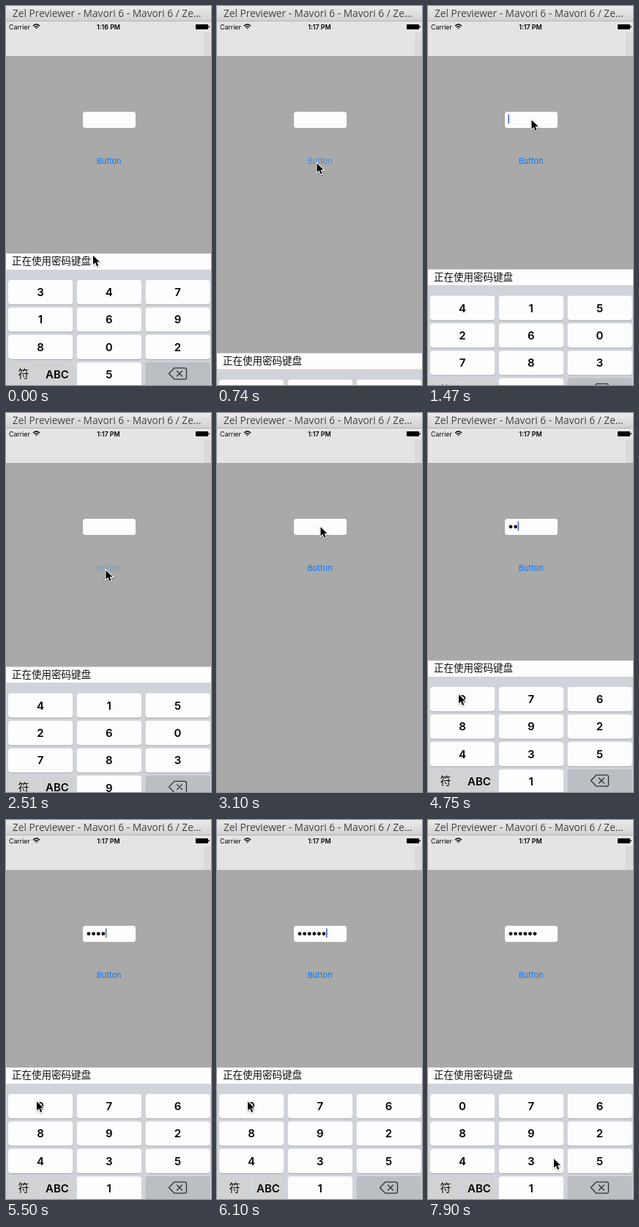
Recreate the animation shown at these times as an HTML page. Size 280 by 516 pixels, loop 8000 ms.

```html
<!DOCTYPE html>
<html lang="en">
<head>
<meta charset="utf-8">
<title>Password keyboard</title>
<style>
  html, body { margin: 0; width: 100%; height: 100%; overflow: hidden; background: #a9a9a9; }
  svg { display: block; width: 280px; height: 516px; font-family: Inter, "Liberation Sans", sans-serif; }
  .title { font-family: "Open Sans", "Noto Sans", sans-serif; fill: #444; }
  .cjk { font-family: "Noto Sans CJK SC", "Noto Sans CJK", sans-serif; font-weight: 300; fill: #111; }
  .bold { font-weight: 600; }
  .mid { text-anchor: middle; }
  .key { fill: #fdfdfd; }
  .key.down { fill: #c0c3c8; }
  .shade { fill: #a3a6ab; }
  #cursor { fill: #000; stroke: #fff; stroke-width: 2; paint-order: stroke; filter: drop-shadow(0 1px 1px rgba(0, 0, 0, .3)); }
</style>
</head>
<body>
<svg viewBox="0 0 280 516">
  <defs>
    <linearGradient id="bar" x2="0" y2="1">
      <stop offset="0" stop-color="#ebebeb"/>
      <stop offset="1" stop-color="#d2d2d2"/>
    </linearGradient>
  </defs>

  <rect width="280" height="516" fill="#a9a9a9"/>
  <rect y="20" width="280" height="48" fill="#e4e4e4"/>
  <rect x="270" y="36" width="10" height="32" fill="#dadada"/>
  <rect width="280" height="20" fill="url(#bar)"/>
  <rect y="20" width="280" height="1" fill="#b4b4b4"/>
  <text class="title" x="9" y="15" font-size="13.7">Zel Previewer - Mavori 6 - Mavori 6 / Ze…</text>

  <text x="4" y="31.5" font-size="8.8">Carrier</text>
  <g fill="none" stroke="#000" stroke-width="1.4">
    <path d="M37 27.2Q41.5 22.8 46 27.2M38.8 29.1Q41.5 26.4 44.2 29.1"/>
    <path d="M41.5 31.6l-1.2-1.4q1.2-1 2.4 0z" fill="#000" stroke="none"/>
  </g>
  <text id="clock" class="bold mid" x="140" y="31.5" font-size="8.8"></text>
  <rect x="259" y="25" width="17" height="6.7" rx="1" fill="#000"/>
  <rect x="276.5" y="27" width="1.3" height="2.5" fill="#000"/>

  <rect x="105" y="144" width="72" height="22" rx="3.5" fill="#fdfdfd"/>
  <g id="dots"></g>
  <rect id="caret" y="147.5" width="1.6" height="12.5" fill="#4668dc"/>
  <text id="button" class="mid" x="140.6" y="215" font-size="11" fill="#087aff">Button</text>

  <g id="board">
    <rect y="337" width="280" height="22" fill="#fdfdfd"/>
    <text class="cjk" x="8" y="352" font-size="13.5">正在使用密码键盘</text>
    <rect y="359" width="280" height="180" fill="#d0d3d9"/>
    <g id="keys"></g>
    <g fill="#d2d2d3">
      <rect x="3" y="485" width="42" height="33.5"/>
      <rect x="49" y="485" width="42" height="33.5"/>
    </g>
    <text class="cjk mid" x="24" y="506" font-size="15">符</text>
    <text class="bold mid" x="70" y="506.5" font-size="15">ABC</text>
    <rect x="190.5" y="485" width="88.5" height="33.5" rx="4" fill="#bbbec3"/>
    <g fill="none" stroke="#333" stroke-width="1.3" stroke-linejoin="round" stroke-linecap="round">
      <path d="M222.5 500.5l7.5-7.7h14q2.5 0 2.5 2.5v10.4q0 2.5-2.5 2.5h-14z"/>
      <path d="M233.5 497l7 7m0-7l-7 7"/>
    </g>
  </g>

  <path id="cursor" d="M1 1.7V14L4 11.2L6.2 16.4L8.2 15.6L6 10.4H10Z"/>
</svg>
<script>
const LOOP = 8000;
const HEIGHT = 179;
const LAYOUTS = ['3471698025', '4152607839', '0768924351'];
const HIDES = [590, 2491];
const SHOWS = [1270, 3405];
const PRESSES = [[4300, 4450], [5050, 5200], [5350, 5500], [5650, 5800], [5950, 6100],
                 [6850, 7000], [7150, 7300], [7450, 7600]];
const TYPED = [4450, 4750, 5200, 5500, 5800, 6100];
const CARET = [[1320, 1910], [2360, 2500], [3405, 6700], [7150, 7750]];
const PATH = [[0, 118, 338], [450, 135.5, 212.5], [740, 135.5, 212.5], [1030, 140.5, 153.5],
              [1620, 140.5, 153.5], [2360, 135.5, 212.5], [2650, 135.5, 212.5], [3100, 140.5, 153.5],
              [3400, 140.5, 153.5], [3700, 118, 259], [4000, 41, 381.5], [7600, 41, 381.5],
              [7900, 171, 459.5]];

const SHORT = [3, 6, 9, 14, 18];
const TICKS = [0];
while (TICKS.length < 54) {
  const n = TICKS.length;
  TICKS.push(TICKS[n - 1] + (SHORT.includes(n) ? 140 : 150));
}

const $ = id => document.getElementById(id);
const within = (spans, t) => spans.some(([a, b]) => t >= a && t < b);

function add(parent, name, attrs) {
  const el = document.createElementNS('http://www.w3.org/2000/svg', name);
  for (const k in attrs) el.setAttribute(k, attrs[k]);
  return parent.appendChild(el);
}

const keys = [...Array(10).keys()].map(i => {
  const x = 3 + (i === 9 ? 1 : i % 3) * 93.75;
  const y = 373 + Math.floor(i / 3) * 37.4;
  const box = { x, width: 88.3, height: 33.2, rx: 4 };
  add($('keys'), 'rect', { ...box, y: y + 1, class: 'shade' });
  const cap = add($('keys'), 'rect', { ...box, y, class: 'key' });
  const label = add($('keys'), 'text', { x: x + 44, y: y + 22, 'font-size': 15, class: 'bold mid' });
  return { cap, label };
});

const dots = TYPED.map((_, i) => add($('dots'), 'circle', { cx: 113 + i * 6.6, cy: 154.8, r: 2.4 }));

// Critically damped spring: the share of travel left after ms.
function left(ms) {
  const a = Math.max(0, ms) * 0.01826;
  return Math.exp(-a) * (1 + a);
}

function drop(t) {
  if (t < SHOWS[0]) return 1 - left(t - HIDES[0]);
  if (t < HIDES[1]) return left(t - SHOWS[0]);
  if (t < SHOWS[1]) return 1 - left(t - HIDES[1]);
  return left(t - SHOWS[1]);
}

function pointer(t) {
  const i = PATH.findIndex(p => p[0] > t);
  if (i < 0) return PATH[PATH.length - 1].slice(1);
  const [a, b] = [PATH[i - 1], PATH[i]];
  const f = (t - a[0]) / (b[0] - a[0]);
  return [1, 2].map(k => a[k] + (b[k] - a[k]) * f);
}

function buttonAlpha(t) {
  const tap = HIDES.find(h => t >= h - 140 && t < h + 400);
  if (tap === undefined) return 1;
  return t < tap ? 0.2 : Math.min(1, 0.25 + (t - tap) / 400);
}

function draw(now) {
  const ms = now % LOOP;
  const t = TICKS.filter(x => x <= ms).pop();
  const layout = LAYOUTS[SHOWS.filter(s => t >= s).length];
  const count = TYPED.filter(x => t >= x).length;

  $('clock').textContent = t < 600 ? '1:16 PM' : '1:17 PM';
  $('board').setAttribute('transform', `translate(0 ${(drop(t) * HEIGHT).toFixed(1)})`);
  keys.forEach((k, i) => { k.label.textContent = layout[i]; });
  keys[0].cap.classList.toggle('down', within(PRESSES, t));
  dots.forEach((d, i) => d.setAttribute('opacity', i < count ? 1 : 0));
  $('caret').setAttribute('x', 109.4 + count * 6.6);
  $('caret').setAttribute('opacity', within(CARET, t) ? 1 : 0);
  $('button').setAttribute('opacity', buttonAlpha(t));
  $('cursor').setAttribute('transform', `translate(${pointer(t)})`);
}

let start;
function loop(now) {
  start ??= now;
  draw(now - start);
  requestAnimationFrame(loop);
}
draw(0);
requestAnimationFrame(loop);
</script>
</body>
</html>
```
